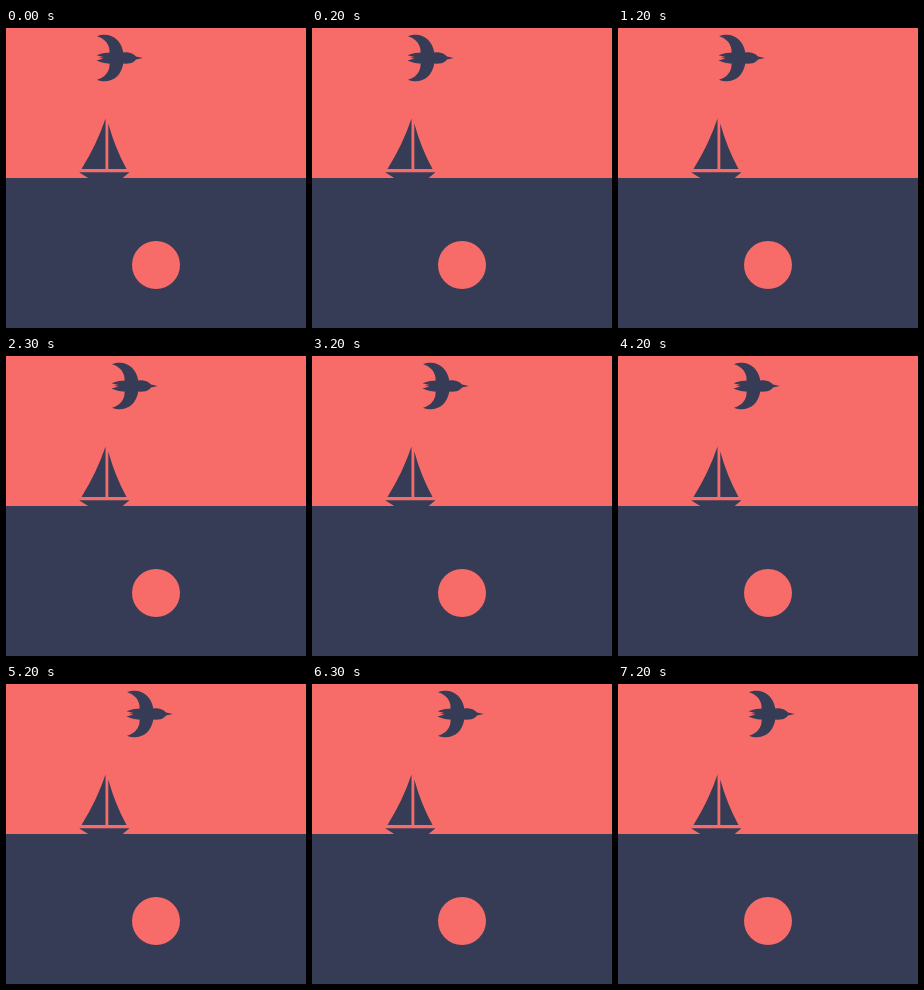
Animation, 300 px wide and 300 px high, one loop 8 s. Source, as an HTML page:

```html
<!DOCTYPE html>
<html lang="en">
<head>
<meta charset="utf-8">
<title>Bird over the sea</title>
<style>
  html, body { margin: 0; width: 100%; height: 100%; overflow: hidden; background: #f76c69; }
  svg { display: block; width: 100%; height: 100%; }
</style>
</head>
<body>
<svg viewBox="0 0 300 300">
  <rect width="300" height="300" fill="#f76c69"/>
  <g fill="#363c56">
    <rect y="150" width="300" height="150"/>
    <path d="M99.5 90.5V141H75.5Q91 116 99.5 90.5Z"/>
    <path d="M102.3 95.5Q109 120 120.5 141H102.3Z"/>
    <path d="M73 144.3H123.5L116 150.5H83Z"/>
    <g id="bird">
      <path id="wing" d="M91 8.2C103 3.5 115 10 117.3 24.5L117.3 30H102C106 22 102.5 11.5 91 8.2Z"/>
      <use href="#wing" transform="matrix(1 0 0 -1 0 60)"/>
      <path d="M90.5 27.2C97 24.6 103 24.2 109 24.6C114 25 118 24.2 122 24.4C126 24.6 128.5 26.5 130 28.6L136.8 30L130 31.4C128.5 33.5 126 35.4 122 35.6C118 35.8 114 35 109 35.4C103 35.8 97 35.4 90.5 32.4L97.5 30.6L92.5 29.8L97.5 29Z"/>
    </g>
  </g>
  <circle cx="150" cy="237" r="24" fill="#f76c69"/>
</svg>
<script>
  const LOOP = 8000;
  const STEP = 5;
  const steps = [200, 1200, 2300, 3200, 4200, 5200, 6300, 7200];
  const bird = document.getElementById('bird');
  const start = performance.now();

  function draw(t) {
    const moved = steps.filter(s => t >= s).length;
    bird.setAttribute('transform', `translate(${moved * STEP} 0)`);
  }

  function tick() {
    draw((performance.now() - start) % LOOP);
    requestAnimationFrame(tick);
  }
  tick();
</script>
</body>
</html>
```
